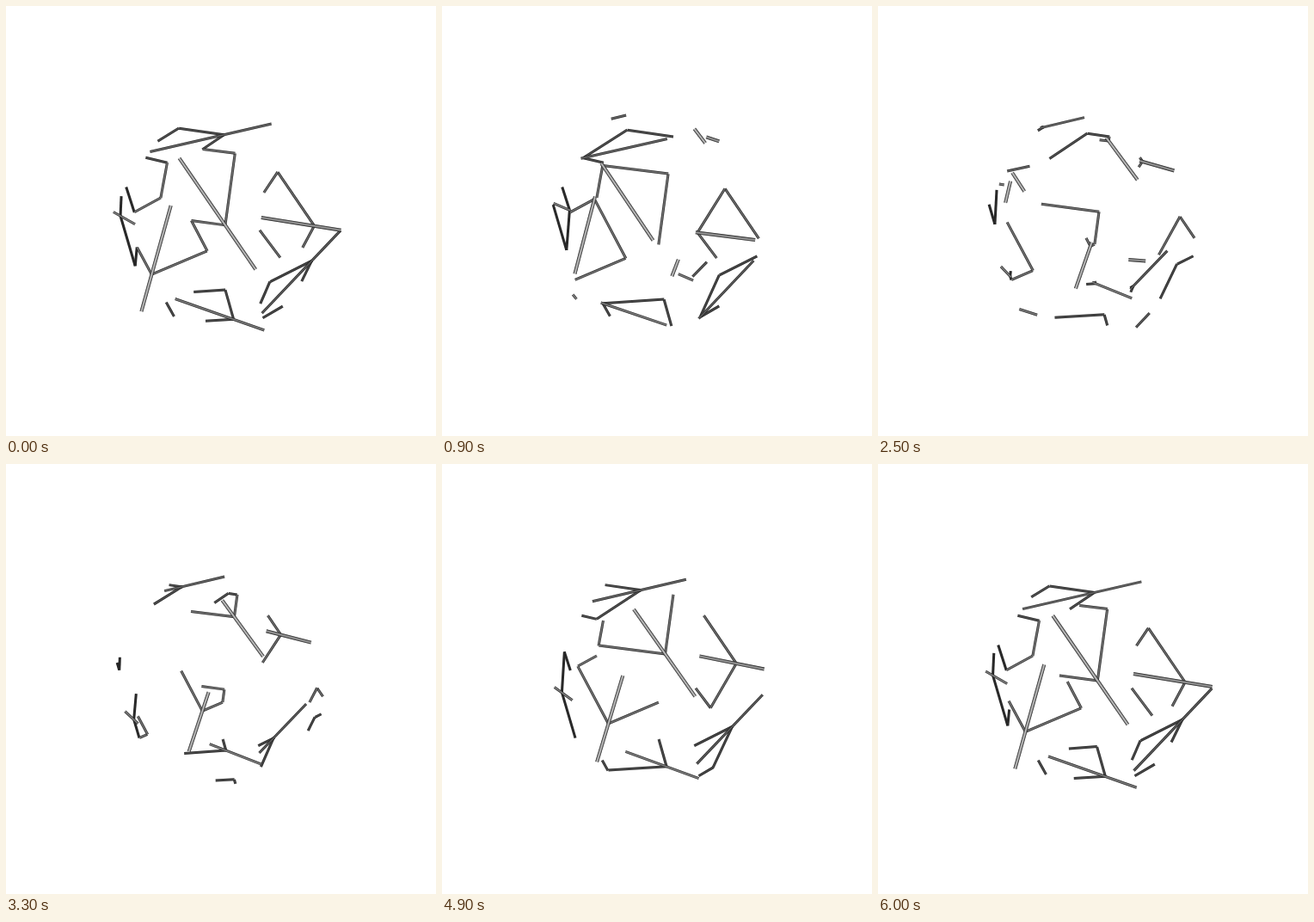
An HTML page without scripts for the animation above (6100 ms loop, 500 by 500 pixels).

```html
<!DOCTYPE html>
<html lang="en">
<head>
<meta charset="utf-8">
<title>Rods sweeping over an icosahedron</title>
<style>
@property --t { syntax: '<number>'; inherits: true; initial-value: 0; }
@keyframes sweep { to { --t: 1; } }

html, body { margin: 0; width: 100%; height: 100%; overflow: hidden; background: #fff; }

/* Visible corners: screen x, y and relative depth d */
body {
  --x0: 145;   --y0: 196.5; --d0: .805;
  --x1: 308;   --y1: 136;   --d1: .83;
  --x2: 289;   --y2: 305;   --d2: .749;
  --x3: 156.5; --y3: 354;   --d3: .894;
  --x4: 123.7; --y4: 238.5; --d4: 1.065;
  --x5: 200;   --y5: 124.5; --d5: 1.025;
  --x6: 388.5; --y6: 259.5; --d6: .935;
  --x7: 299.5; --y7: 376;   --d7: .975;
  animation: sweep 6.1s steps(61) infinite;
}

/* Each face: apex a, then corners b and c clockwise */
.a0 { --ax: var(--x0); --ay: var(--y0); --ad: var(--d0); }
.a2 { --ax: var(--x2); --ay: var(--y2); --ad: var(--d2); }
.a3 { --ax: var(--x3); --ay: var(--y3); --ad: var(--d3); }
.a7 { --ax: var(--x7); --ay: var(--y7); --ad: var(--d7); }
.b1 { --bx: var(--x1); --by: var(--y1); --bd: var(--d1); }
.b2 { --bx: var(--x2); --by: var(--y2); --bd: var(--d2); }
.b3 { --bx: var(--x3); --by: var(--y3); --bd: var(--d3); }
.b5 { --bx: var(--x5); --by: var(--y5); --bd: var(--d5); }
.c1 { --cx: var(--x1); --cy: var(--y1); --cd: var(--d1); }
.c2 { --cx: var(--x2); --cy: var(--y2); --cd: var(--d2); }
.c3 { --cx: var(--x3); --cy: var(--y3); --cd: var(--d3); }
.c4 { --cx: var(--x4); --cy: var(--y4); --cd: var(--d4); }
.c6 { --cx: var(--x6); --cy: var(--y6); --cd: var(--d6); }
.c7 { --cx: var(--x7); --cy: var(--y7); --cd: var(--d7); }

/* A band on a face runs from its front to its back, one unit behind */
b { --n: 0; --front: calc(1.5 - 2 * (var(--t) + var(--n))); --back: calc(var(--front) + 1); }
b + b { --n: 1; }

/* A line joins face points (u, v) and (p, q), projected with depth */
i {
  --k: calc((1 - var(--u) - var(--v)) * var(--ad));
  --l: calc(var(--u) * var(--bd));
  --m: calc(var(--v) * var(--cd));
  --sum: calc(var(--k) + var(--l) + var(--m));
  --sx: calc((var(--k) * var(--ax) + var(--l) * var(--bx) + var(--m) * var(--cx)) / var(--sum));
  --sy: calc((var(--k) * var(--ay) + var(--l) * var(--by) + var(--m) * var(--cy)) / var(--sum));
  --K: calc((1 - var(--p) - var(--q)) * var(--ad));
  --L: calc(var(--p) * var(--bd));
  --M: calc(var(--q) * var(--cd));
  --end: calc(var(--K) + var(--L) + var(--M));
  --dx: calc((var(--K) * var(--ax) + var(--L) * var(--bx) + var(--M) * var(--cx)) / var(--end) - var(--sx));
  --dy: calc((var(--K) * var(--ay) + var(--L) * var(--by) + var(--M) * var(--cy)) / var(--end) - var(--sy));
  position: absolute;
  left: .5px;
  top: .5px;
  width: calc(hypot(var(--dx), var(--dy)) * 1px);
  height: var(--h, 2.6px);
  background: linear-gradient(#1c1c1c, var(--ink) 42% 58%, #1c1c1c);
  transform-origin: 0 0;
  transform: translate(calc(var(--sx) * 1px), calc(var(--sy) * 1px)) rotate(atan2(var(--dy), var(--dx))) translateY(-50%);
}

/* Chords parallel to the base, at height --e from the apex */
.outer { --e: .75; }
.inner { --e: .25; }
.outer, .inner {
  --w: clamp(-1 * var(--e), var(--back), var(--e));
  --z: clamp(-1 * var(--e), var(--front), var(--e));
  --u: calc((var(--e) + var(--w)) / 2);
  --v: calc((var(--e) - var(--w)) / 2);
  --p: calc((var(--e) + var(--z)) / 2);
  --q: calc((var(--e) - var(--z)) / 2);
}

/* Arms run from the outer chord towards the apex */
.lead { --w: clamp(-.75, var(--front), .75); }
.tail { --w: clamp(-.75, var(--back), .75); }
.lead, .tail {
  --in: max(0, (.25 - max(var(--w), -1 * var(--w))) / 2);
  --u: calc((.75 + var(--w)) / 2);
  --v: calc((.75 - var(--w)) / 2);
  --p: calc(max(var(--w), 0) + var(--in));
  --q: calc(max(-1 * var(--w), 0) + var(--in));
}

/* The rod crosses the whole face from b, past c, to a */
.rod {
  --s: clamp(0, .5 + var(--front) / 3, 1);
  --u: var(--s);
  --v: 0;
  --q: min(1.5 * (1 - var(--s)), 3 * var(--s));
  --p: calc(var(--s) - var(--q) / 3);
  --ink: var(--shine);
  --h: var(--thick, 3px);
}

.top   { --ink: #505050; --shine: #686868; }
.front { --ink: #747474; --shine: #bcbcbc; --thick: 4px; }
.right { --ink: #6c6c6c; --shine: #999; --thick: 3.6px; }
.low   { --ink: #4c4c4c; --shine: #808080; }
.side  { --ink: #484848; --shine: #5c5c5c; }
.left  { --ink: #2c2c2c; --shine: #808080; }
</style>
</head>
<body>
<div class="left a0 b3 c4">
  <b><i class="outer"></i><i class="inner"></i><i class="lead"></i><i class="tail"></i><i class="rod"></i></b>
  <b><i class="outer"></i><i class="inner"></i><i class="lead"></i><i class="tail"></i><i class="rod"></i></b>
</div>
<div class="top a0 b5 c1">
  <b><i class="outer"></i><i class="inner"></i><i class="lead"></i><i class="tail"></i><i class="rod"></i></b>
  <b><i class="outer"></i><i class="inner"></i><i class="lead"></i><i class="tail"></i><i class="rod"></i></b>
</div>
<div class="side a7 b2 c6">
  <b><i class="outer"></i><i class="inner"></i><i class="lead"></i><i class="tail"></i><i class="rod"></i></b>
  <b><i class="outer"></i><i class="inner"></i><i class="lead"></i><i class="tail"></i><i class="rod"></i></b>
</div>
<div class="low a3 b2 c7">
  <b><i class="outer"></i><i class="inner"></i><i class="lead"></i><i class="tail"></i><i class="rod"></i></b>
  <b><i class="outer"></i><i class="inner"></i><i class="lead"></i><i class="tail"></i><i class="rod"></i></b>
</div>
<div class="right a2 b1 c6">
  <b><i class="outer"></i><i class="inner"></i><i class="lead"></i><i class="tail"></i><i class="rod"></i></b>
  <b><i class="outer"></i><i class="inner"></i><i class="lead"></i><i class="tail"></i><i class="rod"></i></b>
</div>
<div class="front a0 b2 c3">
  <b><i class="outer"></i><i class="inner"></i><i class="lead"></i><i class="tail"></i><i class="rod"></i></b>
  <b><i class="outer"></i><i class="inner"></i><i class="lead"></i><i class="tail"></i><i class="rod"></i></b>
</div>
<div class="front a0 b1 c2">
  <b><i class="outer"></i><i class="inner"></i><i class="lead"></i><i class="tail"></i><i class="rod"></i></b>
  <b><i class="outer"></i><i class="inner"></i><i class="lead"></i><i class="tail"></i><i class="rod"></i></b>
</div>
</body>
</html>
```
